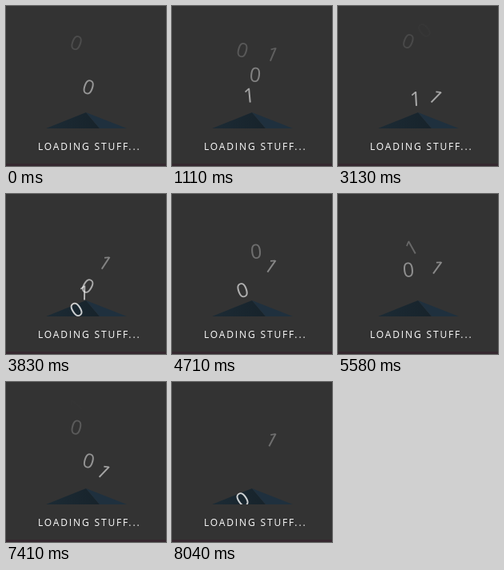
An HTML page that plays this animation: 200x200 px, repeating every 8140 ms.

```html
<!DOCTYPE html>
<html lang="en">
<head>
<meta charset="utf-8">
<title>Loading</title>
<style>
  html, body { margin: 0; width: 100%; height: 100%; overflow: hidden; background: #333; }
  svg { display: block; width: 200px; height: 200px; }
  text { font-family: "Open Sans", "Noto Sans", sans-serif; fill: #fff; }
  .digit { font-size: 25px; text-anchor: middle; }
  .label { font-size: 12px; letter-spacing: 1.85px; }
</style>
</head>
<body>
<svg viewBox="0 0 200 200">
  <defs>
    <clipPath id="well"><rect x="50" y="13" width="100" height="140"/></clipPath>
    <linearGradient id="shade">
      <stop offset="0" stop-color="#1c2b35"/>
      <stop offset="1" stop-color="#17232b"/>
    </linearGradient>
  </defs>
  <path d="M50 153L100 133L117 153Z" fill="url(#shade)"/>
  <path d="M100 133L151 153H117Z" fill="#1f303e"/>
  <g id="digits" clip-path="url(#well)"></g>
  <text class="label" x="40" y="180">LOADING STUFF...</text>
  <rect y="197" width="200" height="3" fill="#35282f"/>
</svg>
<script>
  const LOOP = 8140, TOP = 28, FALL = 150, HALF_HEIGHT = 8.9;

  // Each digit falls at its own pace while it drifts, turns and fades in.
  const drops = [
    { char: "0", period: 1048,  phase: .12,  x: [88, 88],   turn: [30, -50] },
    { char: "0", period: 1239,  phase: .489, x: [108, 98],  turn: [-40, 80] },
    { char: "1", period: 857.7, phase: .92,  x: [128, 118], turn: [10, 70] },
    { char: "1", period: 667,   phase: .893, x: [88, 103],  turn: [-50, 30] }
  ];

  const group = document.getElementById("digits");
  for (const drop of drops) {
    drop.node = document.createElementNS("http://www.w3.org/2000/svg", "text");
    drop.node.setAttribute("class", "digit");
    drop.node.setAttribute("y", HALF_HEIGHT);
    drop.node.textContent = drop.char;
    group.append(drop.node);
  }

  const mix = ([from, to], k) => from + (to - from) * k;

  function draw(time) {
    for (const { node, period, phase, x, turn } of drops) {
      const k = (time / period + phase) % 1;
      node.setAttribute("transform",
        `translate(${mix(x, k)} ${TOP + FALL * k}) rotate(${mix(turn, k)})`);
      node.setAttribute("opacity", k);
    }
  }

  const start = performance.now();
  function tick() {
    draw((performance.now() - start) % LOOP);
    requestAnimationFrame(tick);
  }
  tick();
</script>
</body>
</html>
```
